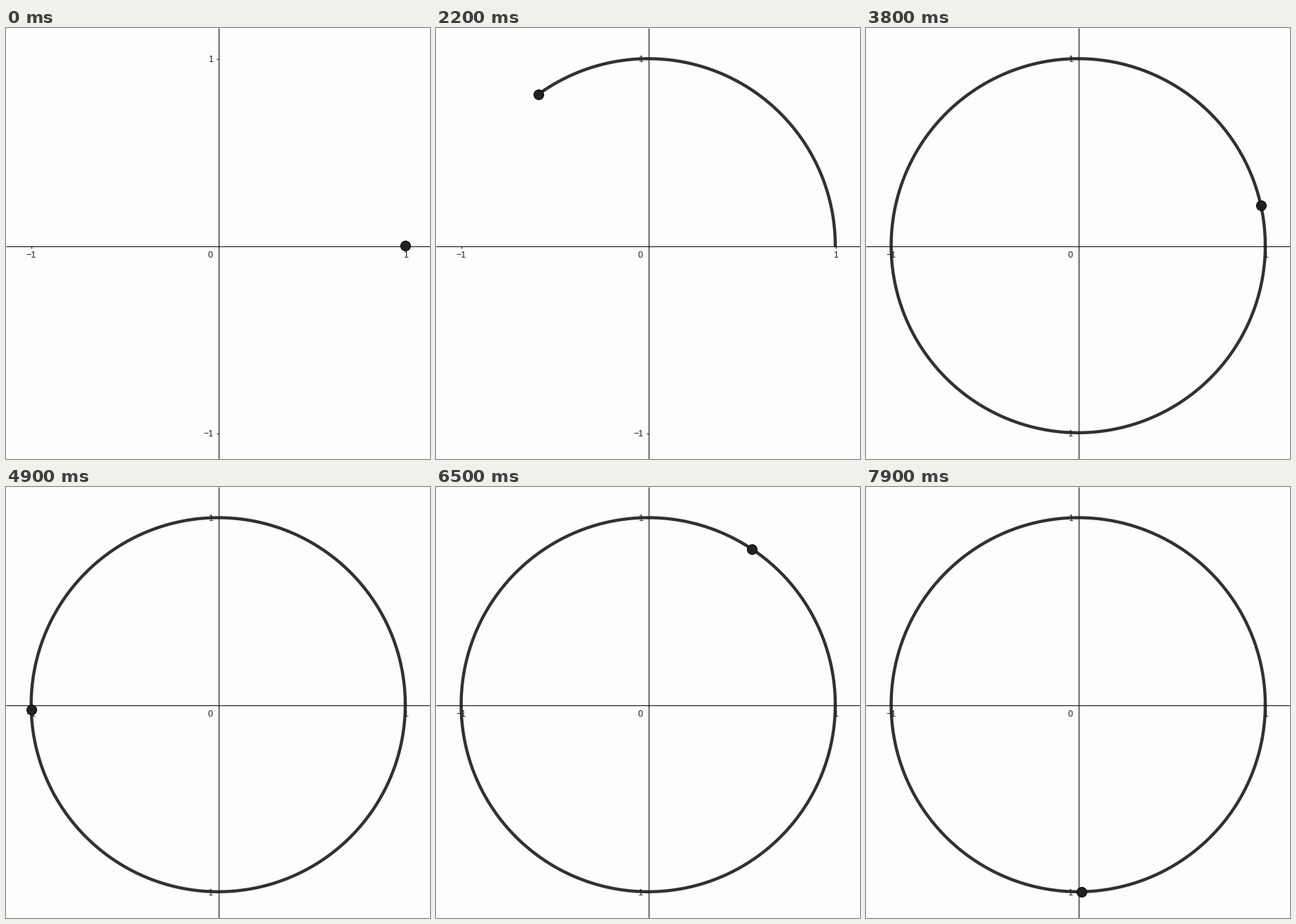
A matplotlib script for the animation above (8 s loop, 600 by 610 pixels).

```python
import numpy as np
import matplotlib.pyplot as plt
from matplotlib.animation import FuncAnimation

W, H, DPI = 600, 610, 100
FRAMES, STEP = 80, 100
CX, CY, R = 299.8, 307.6, 264.7
BG, INK, TRAIL = "#fefdfe", "#1f1e21", "#323034"
PX = 72 / DPI

# Angle of the point in degrees at a few times, linear in between
TIMES = [1400, 2200, 2300, 3100, 3800, 4900, 6500, 7900]
ANGLES = [0, 126, 143, 266.3, 372.5, 541.4, 776.4, 991.1]

fig = plt.figure(figsize=(W / DPI, H / DPI), dpi=DPI, facecolor=BG)
ax = fig.add_axes([0, 0, 1, 1])
ax.set_xlim(-0.5, W - 0.5)
ax.set_ylim(H - 0.5, -0.5)
ax.axis("off")


def line(xs, ys, width=1.2):
    ax.plot(xs, ys, color=INK, lw=width * PX, zorder=2,
            solid_capstyle="butt")


def label(x, y, text):
    ax.text(x, y, text, family="Liberation Sans", fontsize=12.5 * PX,
            color=INK, ha="center", va="center_baseline", zorder=3)


def on_circle(deg):
    a = np.radians(deg)
    return CX + R * np.cos(a), CY - R * np.sin(a)


line([300, 300], [-1, H])
line([-1, W], [308, 308])
for x in (35, 300, 565):
    line([x, x], [308, 311])
for y in (43, 573):
    line([297, 300], [y, y])

label(35, 320, "\u22121")
label(289, 320, "0")
label(565, 320, "1")
label(289, 43, "1")
label(285.5, 573, "\u22121")

trail, = ax.plot([], [], color=TRAIL, lw=4.4 * PX, zorder=1,
                 solid_capstyle="projecting", solid_joinstyle="round")
dot, = ax.plot([], [], "o", ms=13.8 * PX, mfc="#222124", mec="#0c0c0d",
               mew=1.2 * PX, zorder=4)


def draw(i):
    deg = np.interp(i * STEP, TIMES, ANGLES)
    if deg > 0:
        trail.set_data(*on_circle(np.linspace(0, min(deg, 360), 240)))
    else:
        trail.set_data([], [])
    x, y = on_circle(deg)
    dot.set_data([x], [y])
    return trail, dot


anim = FuncAnimation(fig, draw, frames=FRAMES, interval=STEP,
                     init_func=lambda: draw(0), repeat=True, repeat_delay=0)
plt.show()
```
